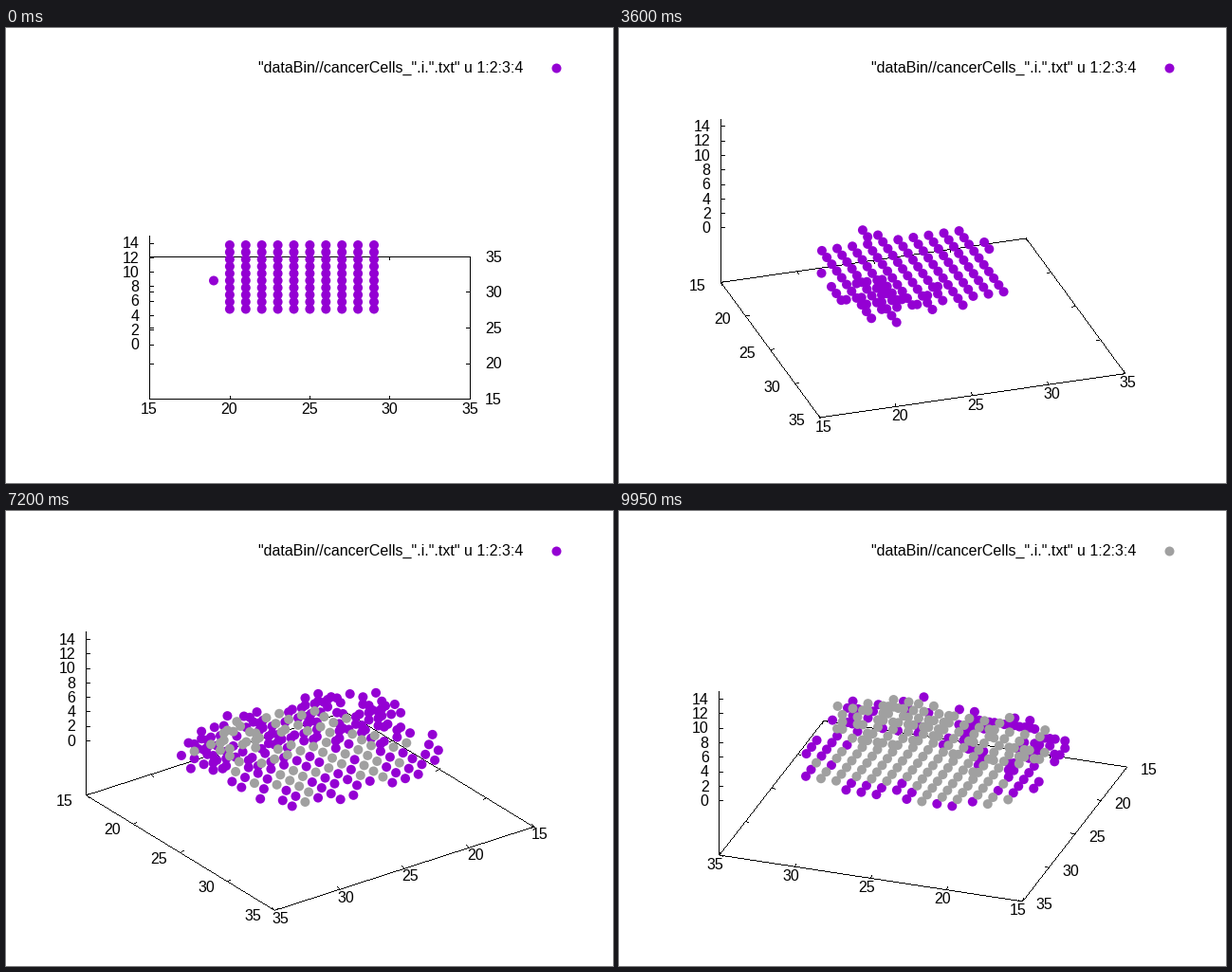
A matplotlib script for the animation above (10000 ms loop, 640x480 px).

```python
import math
import random

import matplotlib.pyplot as plt
from matplotlib.animation import FuncAnimation
from matplotlib.collections import LineCollection

W, H, DPI = 640, 480, 100
FRAMES, INTERVAL = 200, 50
PX = 72 / DPI
PURPLE, GREY = "#9400d3", "#a0a0a0"
LOW, HIGH, MID = 15, 35, 25
TICKS = range(LOW, HIGH + 1, 5)
RX, RY = 169, 75             # half extents of the base plane in pixels
Z_STEP, Z_BASE = 7.64, 57.4  # pixels per z unit, gap below z = 0
KEY_SWITCH = 195
MOUNDS = [(28.5, 21.5, 5), (20.5, 23, 45)]  # centre x, centre y, first birth


def inside(x, y):
    """Rounded-rectangle outline of the full-grown colony."""
    return abs((x - 24.7) / 8.2) ** 3 + abs((y - 24.7) / 6.6) ** 3 <= 1.05


def grow():
    """List of cells as (x, y, z, birth frame, frame of turning grey)."""
    rng = random.Random(4)
    cells = []

    def add(x, y, z, birth):
        birth = max(3, birth)
        cells.append((x, y, z, birth, birth + max(45, rng.gauss(98, 30))))

    for x in range(16, 34):
        for y in range(18, 32):
            if not inside(x, y):
                continue
            d = max(20 - x, x - 29, 20 - y, y - 29, 0)
            if d == 0 or (x, y) == (19, 24):
                cells.append((x, y, 0, 0, rng.gauss(143, 23)))
            else:
                add(x, y, 0, 45 * (d + 1) + rng.gauss(0, 38))
            for cx, cy, start in MOUNDS:
                for z in (1, 2):
                    r = math.hypot(x - cx, y - cy)
                    if r < 5 - 0.8 * z and rng.random() < 0.6:
                        add(x, y, z, start + 22 * r + 35 * (z - 1) + rng.gauss(0, 12))
    return cells


def project(x, y, angle):
    u, v = (x - MID) / 10, (y - MID) / 10
    c, s = math.cos(angle), math.sin(angle)
    return 320 + RX * (u * c + v * s), 316 + RY * (u * s - v * c)


def inward(dx, dy, angle):
    """Screen direction (y up) of a unit step in the base plane."""
    c, s = math.cos(angle), math.sin(angle)
    return dx * c + dy * s, dy * c - dx * s


def pixel_runs(a, b):
    """Split a line into one-pixel-thick horizontal or vertical runs."""
    steep = abs(b[1] - a[1]) > abs(b[0] - a[0])
    if steep:
        a, b = a[::-1], b[::-1]
    (x0, y0), (x1, y1) = sorted([a, b])
    first, last = round(x0), round(x1)
    slope = (y1 - y0) / max(x1 - x0, 1e-9)
    rows = [round(y0 + slope * (x - first)) for x in range(first, last + 1)]
    runs, begin = [], 0
    for k in range(1, len(rows) + 1):
        if k == len(rows) or rows[k] != rows[begin]:
            mid = rows[begin] + 0.5
            run = [(first + begin, mid), (first + k, mid)]
            runs.append([p[::-1] for p in run] if steep else run)
            begin = k
    return runs


CELLS = grow()

fig = plt.figure(figsize=(W / DPI, H / DPI), dpi=DPI, facecolor="white")
ax = fig.add_axes([0, 0, 1, 1])
ax.set_xlim(0, W)
ax.set_ylim(H, 0)
ax.axis("off")

FONT = dict(family="Liberation Sans", size=16 * PX, color="black", va="baseline")
DOT = dict(s=(10 * PX) ** 2, linewidths=0, zorder=2)
lines = LineCollection([], colors="black", linewidths=PX, capstyle="butt", zorder=1)
lines.set_snap(False)
ax.add_collection(lines)
dots = ax.scatter([], [], **DOT)
key = ax.scatter([580.3], [42.4], c=PURPLE, **DOT)
ax.text(545.5, 47, '"dataBin//cancerCells_".i.".txt" u 1:2:3:4', ha="right", **FONT)
x_labels = [ax.text(0, 0, str(v), **FONT) for v in TICKS]
y_labels = [ax.text(0, 0, str(v), **FONT) for v in TICKS]
z_labels = [ax.text(0, 0, str(v), ha="right", **FONT) for v in range(0, 15, 2)]


def place(label, px, py, ux, uy):
    """Put a label outside the edge, justified by the tick direction."""
    if abs(ux) > 0.76:
        label.set_ha("right" if ux > 0 else "left")
        px -= 16 * ux
    else:
        label.set_ha("center")
        px -= 12 * ux
    label.set_position((px, py + 10 * uy + 5.7))


def draw_box(i, angle):
    corners = [(LOW, LOW), (HIGH, LOW), (HIGH, HIGH), (LOW, HIGH)]
    pts = [project(x, y, angle) for x, y in corners]
    segs = [(pts[k - 1], pts[k]) for k in range(4)]

    def add_ticks(points, labels, ux, uy, front):
        for (px, py), label in zip(points, labels):
            segs.append(((px, py), (px + 4 * ux, py - 3 * uy)))
            if front:
                place(label, px, py, ux, uy)

    front_y = LOW if i < 90 else HIGH
    front_x = HIGH if i < 180 else LOW
    for side, sign in ((LOW, 1), (HIGH, -1)):
        along_x = [project(v, side, angle) for v in TICKS]
        along_y = [project(side, v, angle) for v in TICKS]
        add_ticks(along_x, x_labels, *inward(0, sign, angle), side == front_y)
        add_ticks(along_y, y_labels, *inward(sign, 0, angle), side == front_x)

    zx, zy = pts[i // 90]
    segs.append(((zx, zy), (zx, zy - Z_BASE - 15 * Z_STEP)))
    for n, label in enumerate(z_labels):
        ty = zy - Z_BASE - 2 * n * Z_STEP
        segs.append(((zx, ty), (zx + 4, ty)))
        label.set_position((zx - 10.5, ty + 5.7))
    lines.set_segments([run for a, b in segs for run in pixel_runs(a, b)])


def draw_cells(i, angle):
    purple, grey = [], []
    for x, y, z, birth, stop in CELLS:
        if birth <= i:
            px, py = project(x, y, angle)
            spot = (px + 0.4, py + 0.4 - Z_BASE - z * Z_STEP)
            (grey if stop <= i else purple).append(spot)
    dots.set_offsets(purple + grey)
    dots.set_facecolors([PURPLE] * len(purple) + [GREY] * len(grey))


def update(i):
    angle = math.radians(i)
    draw_box(i, angle)
    draw_cells(i, angle)
    key.set_facecolor(GREY if i >= KEY_SWITCH else PURPLE)
    return []


anim = FuncAnimation(fig, update, frames=FRAMES, interval=INTERVAL,
                     repeat=True, repeat_delay=0, blit=False)
plt.show()
```
